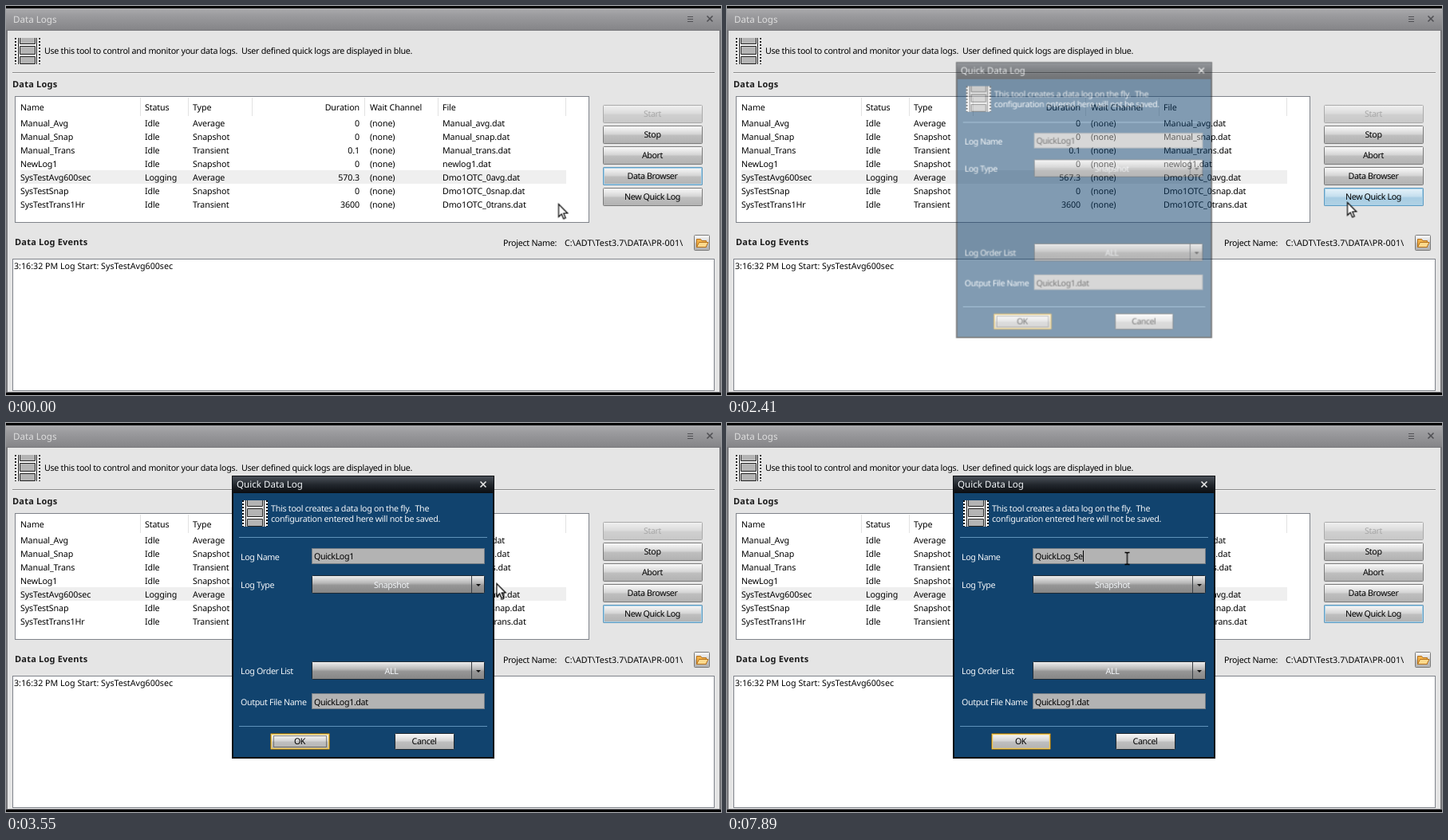
These frames come from a looping animation (896 by 488 pixels, 8000 ms). An HTML page:

```html
<!DOCTYPE html>
<html lang="en">
<head>
<meta charset="utf-8">
<title>Data Logs</title>
<style>
html, body { margin: 0; width: 100%; height: 100%; overflow: hidden; background: #000; }
svg { display: block; width: 896px; height: 488px; }
text { font: 10.7px "Noto Sans", "Open Sans", sans-serif; letter-spacing: -.12px; fill: #000; text-rendering: geometricPrecision; }
.bold { font-weight: 700; font-size: 11px; letter-spacing: .2px; fill: #1c1c1c; }
.title { font-size: 11.6px; letter-spacing: 0; }
.prose { letter-spacing: -.28px; }
.path { letter-spacing: .1px; }
.plain { letter-spacing: 0; }
.tight { letter-spacing: -.38px; }
.end { text-anchor: end; }
.mid { text-anchor: middle; letter-spacing: -.4px; }
.light text { fill: #f2f5f8; }
.light .ink { fill: #000; }
.btn { fill: url(#steel); stroke: #7a7a7a; }
.off { opacity: .55; }
.focus { fill: none; stroke: #5f9cc2; }
.inner { fill: none; stroke: #a6d0e8; }
.combo { fill: url(#dark); stroke: #1d2a36; }
.field { fill: #b3b3b3; stroke: #747d85; }
.rule { fill: none; stroke: #5f92ba; }

.active, .oldFocus, .newFocus, .hover, .dialog, .glow, .arrow, .beam, .cursor, .dots {
  animation: 8s linear infinite;
}
.active { animation-name: active; }
.oldFocus { animation-name: oldFocus; }
.newFocus { animation-name: newFocus; }
.hover { animation-name: hover; }
.dialog { animation-name: dialog; transform-origin: 447.5px 243.5px; }
.glow { animation-name: glow; }
.cursor { animation-name: cursor; }
.arrow { animation-name: arrow; }
.beam { animation-name: beam; }
.dots { animation-name: dots; }
.active, .oldFocus, .newFocus, .arrow, .beam, .dots { animation-timing-function: step-end; }

@keyframes active { 0%, 28.875%, 100% { opacity: 0 } 25.75% { opacity: 1 } }
@keyframes oldFocus { 0% { opacity: 1 } 25.75%, 100% { opacity: 0 } }
@keyframes newFocus { 0% { opacity: 0 } 25.75%, 100% { opacity: 1 } }
@keyframes hover {
  0%, 21.125% { opacity: 0 }
  23.625%, 28.875% { opacity: 1 }
  30.125% { opacity: .75 }
  33.125%, 100% { opacity: 0 }
}
@keyframes dialog {
  0%, 28.875% { opacity: 0; transform: scale(.952) }
  30.125% { opacity: .53; transform: scale(.976) }
  32%, 100% { opacity: 1; transform: none }
}
@keyframes glow { 0%, 44.5% { opacity: 0 } 45.2% { opacity: .6 } 48.25%, 100% { opacity: 0 } }
@keyframes cursor {
  0% { transform: translate(692.5px, 248.5px) }
  17.125% { transform: translate(692.5px, 248.5px); animation-timing-function: ease-in-out }
  23.625% { transform: translate(777.5px, 246.5px) }
  39.625% { transform: translate(777.5px, 246.5px); animation-timing-function: ease-in-out }
  48.25%, 100% { transform: translate(501.5px, 170px) }
}
@keyframes arrow { 0% { opacity: 1 } 46.7%, 100% { opacity: 0 } }
@keyframes beam { 0% { opacity: 0 } 46.7%, 100% { opacity: 1 } }
@keyframes dots { 0% { opacity: 1 } 53.375%, 100% { opacity: 0 } }
</style>
</head>
<body>
<svg viewBox="0 0 896 488">
  <defs>
    <linearGradient id="bar" x2="0" y2="1">
      <stop stop-color="#acacae"/><stop offset=".3" stop-color="#9c9c9f"/><stop offset="1" stop-color="#858588"/>
    </linearGradient>
    <linearGradient id="barOn" x2="0" y2="1">
      <stop stop-color="#62626c"/><stop offset=".25" stop-color="#4a4a54"/><stop offset="1" stop-color="#2b2b33"/>
    </linearGradient>
    <linearGradient id="barDlg" x2="0" y2="1">
      <stop stop-color="#4a5058"/><stop offset=".5" stop-color="#22272d"/><stop offset="1" stop-color="#0a0d11"/>
    </linearGradient>
    <linearGradient id="steel" x2="0" y2="1">
      <stop stop-color="#fbfbfb"/><stop offset=".45" stop-color="#d6d6d6"/>
      <stop offset=".55" stop-color="#bebebe"/><stop offset="1" stop-color="#b2b2b2"/>
    </linearGradient>
    <linearGradient id="dark" x2="0" y2="1">
      <stop stop-color="#f0f0f0"/><stop offset=".42" stop-color="#b8b8b8"/>
      <stop offset=".55" stop-color="#969696"/><stop offset="1" stop-color="#868686"/>
    </linearGradient>
    <linearGradient id="blue" x2="0" y2="1">
      <stop stop-color="#e2f3fc"/><stop offset=".48" stop-color="#c0e2f6"/>
      <stop offset=".54" stop-color="#9fd2f0"/><stop offset="1" stop-color="#b4def5"/>
    </linearGradient>
    <g id="film">
      <path fill="#fff" d="M0 0H32V33H0Z"/>
      <path fill="none" stroke="#111" stroke-width="2" stroke-dasharray="2 2" d="M1 0V33M31 0V33"/>
      <path fill="none" stroke="#111" d="M4.500 0V33M27.500 0V33"/>
      <path fill="#b4b4b4" stroke="#222" d="M6.500 -.500H25.500V7.500H6.500ZM6.500 10.500H25.500V20.500H6.500ZM6.500 23.500H25.500V32.500H6.500Z"/>
    </g>
    <path id="cross" fill="none" stroke-width="1.600" d="M-3.500 -3.500L3.500 3.500M3.500 -3.500L-3.500 3.500"/>
    <path id="drop" fill="#111" d="M-3 -1H3L0 2Z"/>
    <rect id="wide" x="748.5" width="124" height="22" rx="1"/>
    <rect id="wideIn" x="749.5" y="1" width="122" height="20"/>
    <g id="icons">
      <path d="M854 13.500H861M854 16.500H861M854 19.500H861"/>
      <use href="#cross" x="882" y="16"/>
    </g>
  </defs>

  <!-- main window -->
  <rect y="3" width="896" height="482" fill="#77777b"/>
  <rect y="3" width="896" height="27" fill="url(#bar)"/>
  <use href="#icons" stroke="#505054"/>
  <text class="title" x="9" y="21" style="fill:#dedede">Data Logs</text>
  <g class="active">
    <rect y="3" width="896" height="482" fill="#33333b"/>
    <rect y="3" width="896" height="27" fill="url(#barOn)"/>
    <use href="#icons" stroke="#e6e6e6"/>
    <text class="title" x="9" y="21" style="fill:#fff">Data Logs</text>
  </g>
  <rect x="2" y="31" width="892" height="453" fill="#e5e5e5"/>

  <svg x="11" y="40" width="32" height="33"><use href="#film"/></svg>
  <text class="prose" x="48" y="60">Use this tool to control and monitor your data logs.&#160; User defined quick logs are displayed in blue.</text>
  <path stroke="#8b8b8b" d="M8 83.500H888"/>
  <path stroke="#f6f6f6" d="M8 84.500H888"/>

  <text class="bold" x="8" y="102">Data Logs</text>
  <rect x="11.5" y="113.5" width="719" height="158" fill="#fff" stroke="#7f838a"/>
  <path stroke="#e2e2e2" d="M168.500 115V138M228.500 115V138M308.500 115V138M449.500 115V138M541.500 115V138M701.500 115V138"/>
  <g id="list"></g>

  <g class="off"><use href="#wide" y="124.5" class="btn"/><text class="mid" x="810" y="139" style="fill:#777">Start</text></g>
  <use href="#wide" y="150.5" class="btn"/>
  <use href="#wide" y="176.5" class="btn"/>
  <use href="#wide" y="202.5" class="btn"/>
  <use href="#wide" y="228.5" class="btn"/>
  <g class="oldFocus">
    <use href="#wide" y="202.5" class="focus"/>
    <use href="#wideIn" y="202.5" class="inner"/>
  </g>
  <use href="#wide" y="228.5" class="hover" fill="url(#blue)"/>
  <g class="newFocus">
    <use href="#wide" y="228.5" class="focus"/>
    <use href="#wideIn" y="228.5" class="inner"/>
  </g>
  <use href="#wideIn" y="228.5" class="active" fill="none" stroke="#2c6591"/>
  <text class="mid" x="810" y="165">Stop</text>
  <text class="mid" x="810" y="191">Abort</text>
  <text class="mid" x="810" y="217">Data Browser</text>
  <text class="mid" x="810" y="243">New Quick Log</text>

  <text class="bold" x="11" y="300">Data Log Events</text>
  <text class="prose" x="623" y="301">Project Name:</text>
  <text class="path" x="700" y="301">C:\ADT\Test3.7\DATA\PR-001\</text>
  <rect class="btn" x="862.5" y="287.5" width="19" height="19" rx="1"/>
  <path fill="#f2b24a" stroke="#b5711c" d="M865.500 302.500V292.500H870.500L872 294.500H877.500V302.500Z"/>
  <path fill="#fbd98c" stroke="#b5711c" d="M865.500 302.500L868.500 296.500H880L877 302.500Z"/>
  <rect x="8.5" y="317.5" width="879" height="165" fill="#fff" stroke="#7f838a"/>
  <text class="plain" x="10" y="330">3:16:32 PM Log Start: SysTestAvg600sec</text>

  <!-- quick log dialog -->
  <g class="dialog light">
    <rect x="283" y="66" width="329" height="355" fill="#0b0e12"/>
    <rect x="284" y="67" width="327" height="21" fill="url(#barDlg)"/>
    <rect x="285" y="88" width="325" height="331" fill="#11436e"/>
    <text class="title" x="289" y="81">Quick Data Log</text>
    <use href="#cross" x="598" y="77" stroke="#e8e8e8"/>
    <svg x="296" y="97" width="32" height="33"><use href="#film"/></svg>
    <text class="prose" x="332" y="111">This tool creates a data log on the fly.&#160; The</text>
    <text class="prose" x="332" y="124">configuration entered here will not be saved.</text>
    <path class="rule" d="M292 143.500H603M292 380.500H603"/>

    <text class="tight" x="294" y="172">Log Name</text>
    <text class="tight" x="294" y="207">Log Type</text>
    <text class="tight" x="294" y="315">Log Order List</text>
    <text class="tight" x="294" y="354">Output File Name</text>

    <rect class="field" x="383.5" y="157.5" width="216" height="19"/>
    <rect id="mark" x="385" y="160" width="0" height="14" fill="#1a7bd6"/>
    <text class="tight ink" id="name" x="386" y="171">QuickLog1</text>
    <rect id="caret" x="436" y="160" width="1" height="14"/>
    <rect class="field" x="383.5" y="339.5" width="216" height="19"/>
    <text class="tight ink" x="386" y="354">QuickLog1.dat</text>

    <rect class="combo" x="383.5" y="191.5" width="216" height="22" rx="1"/>
    <rect class="glow" x="383.5" y="191.5" width="216" height="22" rx="1" fill="url(#blue)"/>
    <rect class="combo" x="383.5" y="299.5" width="216" height="22" rx="1"/>
    <path stroke="#3a3f45" d="M583.500 192V213M583.500 300V321"/>
    <use href="#drop" x="592" y="203"/>
    <use href="#drop" x="592" y="311"/>
    <text class="mid" x="483" y="207">Snapshot</text>
    <text class="mid" x="483" y="315">ALL</text>

    <rect class="btn" x="331.5" y="389.5" width="74" height="20" rx="1" style="stroke:#5d4a1c"/>
    <rect x="332.5" y="390.5" width="72" height="18" fill="none" stroke="#efc650" stroke-width="1.4"/>
    <rect class="dots" x="335.5" y="392.5" width="66" height="14" fill="none" stroke="#222" stroke-dasharray="1 1"/>
    <rect class="btn" x="487.5" y="389.5" width="74" height="20" rx="1" style="stroke:#20282f"/>
    <text class="mid ink" x="368" y="403">OK</text>
    <text class="mid ink" x="524" y="403">Cancel</text>
  </g>

  <g class="cursor">
    <path class="arrow" fill="#fff" stroke="#000" stroke-width="1.2" d="M0 0V16L3.700 12.500 6.200 18.500 8.800 17.500 6.300 11.500H11.300Z"/>
    <path class="beam" fill="none" stroke="#000" stroke-width="1.3" d="M-3 -7.500H-1L0 -6.500 1 -7.500H3M0 -6.500V6.500M-3 7.500H-1L0 6.500 1 7.500H3"/>
  </g>
</svg>

<script>
const $ = id => document.getElementById(id);
const LOOP = 8000;
const cols = [18, 174, 234, 443, 456, 547];
const logs = [
  'Manual_Avg|Idle|Average|0|Manual_avg.dat',
  'Manual_Snap|Idle|Snapshot|0|Manual_snap.dat',
  'Manual_Trans|Idle|Transient|0.1|Manual_trans.dat',
  'NewLog1|Idle|Snapshot|0|newlog1.dat',
  'SysTestAvg600sec|Logging|Average|570.3|Dmo1OTC_0avg.dat',
  'SysTestSnap|Idle|Snapshot|0|Dmo1OTC_0snap.dat',
  'SysTestTrans1Hr|Idle|Transient|3600|Dmo1OTC_0trans.dat'
];

const line = (cells, y) => cells.map((s, i) =>
  `<text x="${cols[i]}" y="${y}"${i === 3 ? ' class="end"' : ''}>${s}</text>`).join('');

const rowMarkup = (log, i) => {
  const cells = log.split('|');
  cells.splice(4, 0, '(none)');
  const band = i === 4 ? '<rect x="18" y="206" width="684" height="17" fill="#efefef"/>' : '';
  return `<g class="row">${band}${line(cells, 151 + 17 * i)}</g>`;
};

$('list').innerHTML =
  line(['Name', 'Status', 'Type', 'Duration', 'Wait Channel', 'File'], 131) + logs.map(rowMarkup).join('');

const rows = [...document.querySelectorAll('.row')];
const counter = rows[4].querySelector('.end');
const name = $('name'), caret = $('caret'), mark = $('mark');

const typed = 'QuickLog_Se';
const keyTimes = [5820, 6000, 6130, 6340, 6480, 6720, 7060, 7170, 7550, 7820, 7890];
const ticks = [480, 1480, 2410, 3410, 4410, 5410, 6410, 7410];
const passed = (times, t) => times.filter(x => x <= t).length;
const within = (t, a, b) => t >= a && t < b;

// The list is rebuilt row by row on a refresh.
function rowsShown(t) {
  if (within(t, 4410, 4440)) return 0;
  if (within(t, 4440, 4480)) return 4;
  if (within(t, 7550, 7650)) return 6;
  return rows.length;
}

function draw(t) {
  counter.textContent = (570.3 - passed(ticks, t)).toFixed(1);
  const shown = rowsShown(t);
  rows.forEach((r, i) => r.style.visibility = i < shown ? 'visible' : 'hidden');

  const keys = passed(keyTimes, t);
  name.textContent = keys ? typed.slice(0, keys) : 'QuickLog1';
  const width = name.getComputedTextLength();
  const selected = within(t, 4480, keyTimes[0]);
  name.style.fill = selected ? '#fff' : '#000';
  mark.setAttribute('width', selected ? width + 1 : 0);
  caret.setAttribute('x', Math.round(386 + width));
  caret.style.fill = selected ? '#e58429' : '#000';
  caret.style.opacity = t >= 4270 && !within(t, 5000, 5550) ? 1 : 0;
}

let start;
function frame(now) {
  start ??= now;
  draw((now - start) % LOOP);
  requestAnimationFrame(frame);
}
draw(0);
requestAnimationFrame(frame);
</script>
</body>
</html>
```
